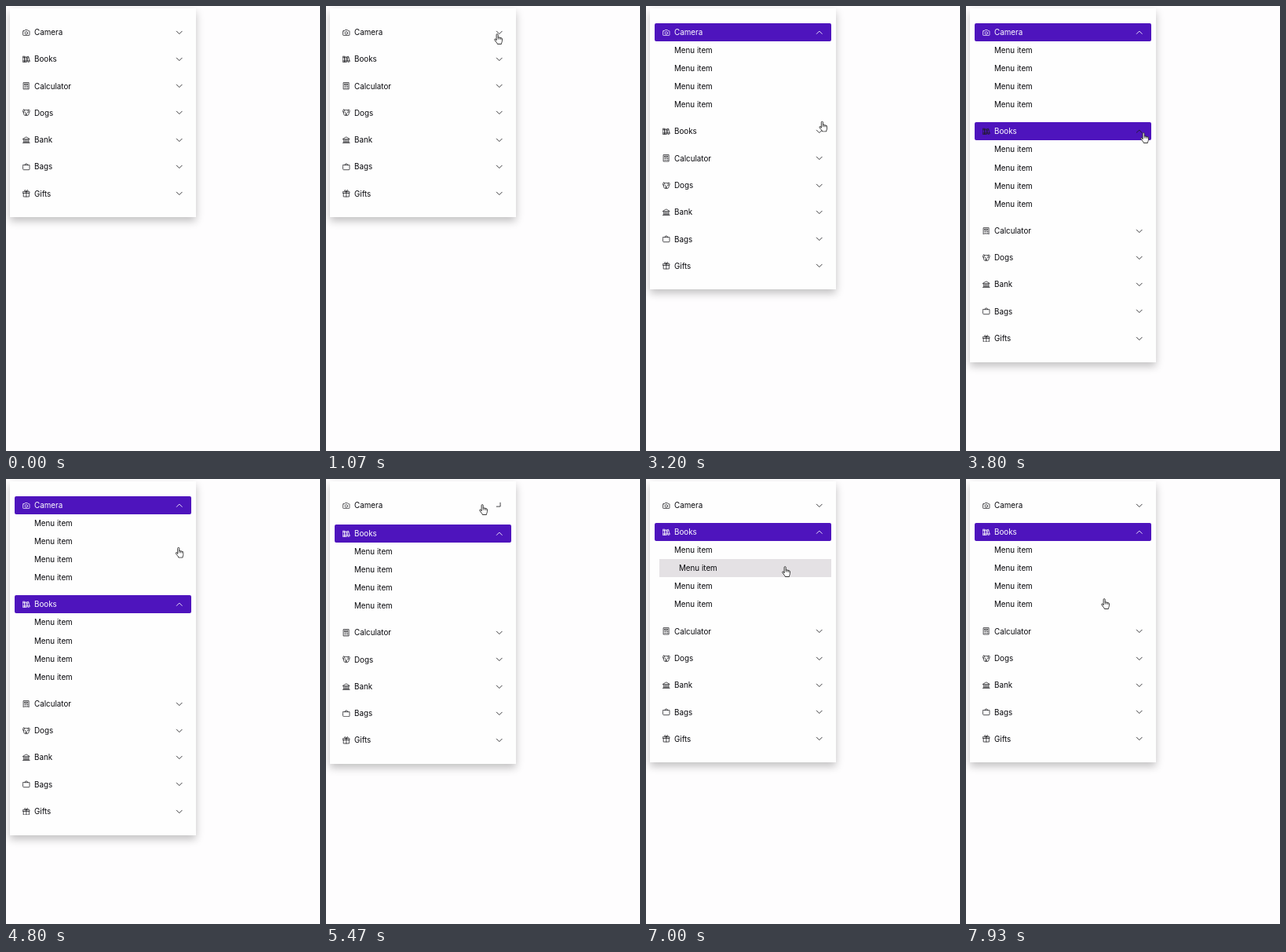
These frames come from a looping animation (400x567 px, 8 s). An HTML page:

```html
<!DOCTYPE html>
<html lang="en">
<head>
<meta charset="utf-8">
<title>Accordion menu</title>
<style>
  html, body { margin: 0; width: 100%; height: 100%; overflow: hidden; background: #fefdfe; }
  body { position: relative; font: 400 9.8px/23.05px Inter, "Open Sans", sans-serif; color: #08080c; }
  svg { fill: none; stroke: currentColor; stroke-linecap: round; stroke-linejoin: round; }
  .panel {
    position: absolute; left: 5px; top: 3.4px; width: 236.8px; box-sizing: border-box;
    padding: 18.6px 6px 7.3px; background: #fefefe; box-shadow: 0 5px 10px rgb(0 0 0 / .24);
  }
  .group { margin-bottom: 11.22px; --bar: 0; --ink: 0; --turn: 0; --open: 0; }
  .head {
    position: relative; height: 23.05px; padding-left: 25px; border-radius: 2px;
    background: rgb(78 20 189 / var(--bar));
    color: color-mix(in srgb, #fff calc(var(--bar) * 100%), #08080c);
  }
  .head svg {
    position: absolute; top: 6.7px; width: 9.6px; height: 9.6px; stroke-width: 1.25;
    color: color-mix(in srgb, #fff calc(var(--ink) * 100%), #18181c);
  }
  .icon { left: 10.2px; }
  .head .arrow { left: 204.9px; stroke-width: 1.4; transform: rotate(calc(var(--turn) * -180deg)); }
  .items { height: calc(var(--open) * 92.2px); overflow: hidden; }
  .item {
    --hover: 0; height: 23.05px; padding-left: 25px; margin-left: calc(var(--hover) * 6px);
    background: rgb(228 225 228 / var(--hover));
  }
  #cursor { position: absolute; left: 0; top: 0; width: 11px; height: 14px; fill: #fff; stroke: #222; stroke-width: .9; }
</style>
</head>
<body>
<div class="panel"></div>
<svg id="cursor" viewBox="0 0 11 14">
  <path d="M3.1 8.4V1.7C3.1.2 5.2.2 5.2 1.7V5.2C5.5 4.5 6.9 4.6 7 5.5C7.4 4.9 8.7 5.1 8.8 6C9.3 5.6 10.4 5.8 10.4 6.9V9.4C10.4 11 9.5 11.5 9.4 13.5H4.3C4.1 11.7 2.2 10.6 1 8.6C.1 7.2 1.4 6.4 2.3 7.3Z"/>
  <path d="M5.2 5.2V7.2M7 5.6V7.3M8.8 6V7.5" stroke-width=".7"/>
</svg>
<script>
const LOOP = 8000, ROW = 23.05, PITCH = 34.27, TOP = 22;

const icons = {
  Camera: '<path d="M2 4.5H4L5.5 2.5H10.5L12 4.5H14Q15 4.5 15 5.5V13Q15 14 14 14H2Q1 14 1 13V5.5Q1 4.5 2 4.5Z"/><circle cx="8" cy="9" r="2.9"/>',
  Books: '<path d="M1 2H5V14H1ZM5 3.5H9V14H5ZM1 11.5H9M1 4.5H5M9.5 3L12.5 2 15.5 13 12.5 14ZM10.2 5.5L13.2 4.5M12 11.8L15 10.8"/>',
  Calculator: '<path d="M2.5 1H13.5V15H2.5ZM5 3.5H11V6H5Z"/><path d="M5 9H5.2M8 9H8.2M11 9H11.2M5 12H5.2M8 12H8.2M11 12H11.2" stroke-width="1.8"/>',
  Dogs: '<path d="M4.5 3Q8 2 11.5 3L13.5 1.5L15.5 4.5L14.5 7.5L13.5 7V11L11.5 14H4.5L2.5 11V7L1.5 7.5L.5 4.5L2.5 1.5ZM4.5 3L2.5 7M11.5 3L13.5 7M6.5 10.3H9.5L8 12ZM8 12V14"/><path d="M5.7 7.3V7.5M10.3 7.3V7.5" stroke-width="1.8"/>',
  Bank: '<path d="M1 5.5L8 1.5 15 5.5V6.5H1ZM3 6.5V12M6.3 6.5V12M9.7 6.5V12M13 6.5V12M2 12H14M.8 14.3H15.2"/>',
  Bags: '<path d="M1 4.5H15V13Q15 14.5 13.5 14.5H2.5Q1 14.5 1 13ZM5 4.5Q5 1.5 8 1.5T11 4.5"/>',
  Gifts: '<path d="M1 4.5H15V7.5H1ZM2 7.5V15H14V7.5M8 4.5V15M8 4.5C3 4.5 3.5 .8 5.5 1Q7.5 1.2 8 4.5C8.5 1.2 10 1 10.5 1C12.5 .8 13 4.5 8 4.5"/>'
};

const panel = document.querySelector('.panel');
panel.innerHTML = Object.entries(icons).map(([name, art]) => `<div class="group">
  <div class="head"><svg class="icon" viewBox="0 0 16 16">${art}</svg>${name}
    <svg class="arrow" viewBox="0 0 16 16"><path d="M2.3 5.3L8 11 13.7 5.3"/></svg></div>
  <div class="items">${'<div class="item">Menu item</div>'.repeat(4)}</div></div>`).join('');

const toggles = [
  { open: 1150, close: 5195 },
  { open: 3450, close: Infinity }
];
const groups = [...panel.children].slice(0, toggles.length);
const items = groups.map(group => [...group.querySelectorAll('.item')]);
const cursor = document.getElementById('cursor');

// time, left, top
const path = [
  [70, 386, 128], [450, 300, 75], [870, 214, 35], [2620, 214, 35],
  [3350, 221, 160], [3800, 222, 161], [4450, 222, 161], [5080, 211, 34],
  [5200, 210, 33], [5470, 195, 32], [5950, 193, 34], [6650, 174, 104],
  [7000, 173, 111], [7200, 173, 112], [7500, 173, 128], [7840, 172, 145],
  [7930, 172, 152], [8000, 172, 154]
];

const smooth = p => { p = Math.min(1, Math.max(0, p)); return p * p * (3 - 2 * p); };
const ramp = (t, start, length) => smooth((t - start) / length);

function phase({ open, close }, t, openDelay, closeDelay, length) {
  return ramp(t, open + openDelay, length) - ramp(t, close + closeDelay, length);
}
const slide = (toggle, t) => phase(toggle, t, 0, 0, 300);

function pointer(t) {
  const next = path.findIndex(key => key[0] > t);
  if (next < 1) return path[next < 0 ? path.length - 1 : 0].slice(1);
  const [t0, x0, y0] = path[next - 1], [t1, x1, y1] = path[next];
  const k = smooth((t - t0) / (t1 - t0));
  return [x0 + (x1 - x0) * k, y0 + (y1 - y0) * k];
}

function isOver(group, index, t) {
  if (t < 70) return false;
  const [x, y] = pointer(t);
  const opened = toggles.map(toggle => slide(toggle, t) * 4 * ROW);
  const start = TOP + ROW + group * PITCH + (group ? opened[0] : 0);
  const offset = y + .5 - start;
  return x < 232 && offset < opened[group] && Math.floor(offset / ROW) === index;
}

// Hover builds up after a short dwell and drops at once on leaving.
function hover(group, index, t) {
  let dwell = 0;
  while (dwell < 200 && isOver(group, index, t - dwell)) dwell += 10;
  return ramp(dwell, 60, 140);
}

function draw(t) {
  groups.forEach((group, g) => {
    const toggle = toggles[g], set = (name, value) => group.style.setProperty(name, value);
    set('--open', slide(toggle, t));
    set('--bar', phase(toggle, t, 0, -60, 80));
    set('--turn', phase(toggle, t, 75, 75, 300));
    set('--ink', phase(toggle, t, 330, 75, 250));
    items[g].forEach((item, i) => item.style.setProperty('--hover', hover(g, i, t)));
  });
  const [x, y] = pointer(t);
  cursor.style.visibility = t < 70 ? 'hidden' : 'visible';
  cursor.style.transform = `translate(${x}px, ${y}px)`;
}

const began = performance.now();
function tick() {
  draw((performance.now() - began) % LOOP);
  requestAnimationFrame(tick);
}
tick();
</script>
</body>
</html>
```
